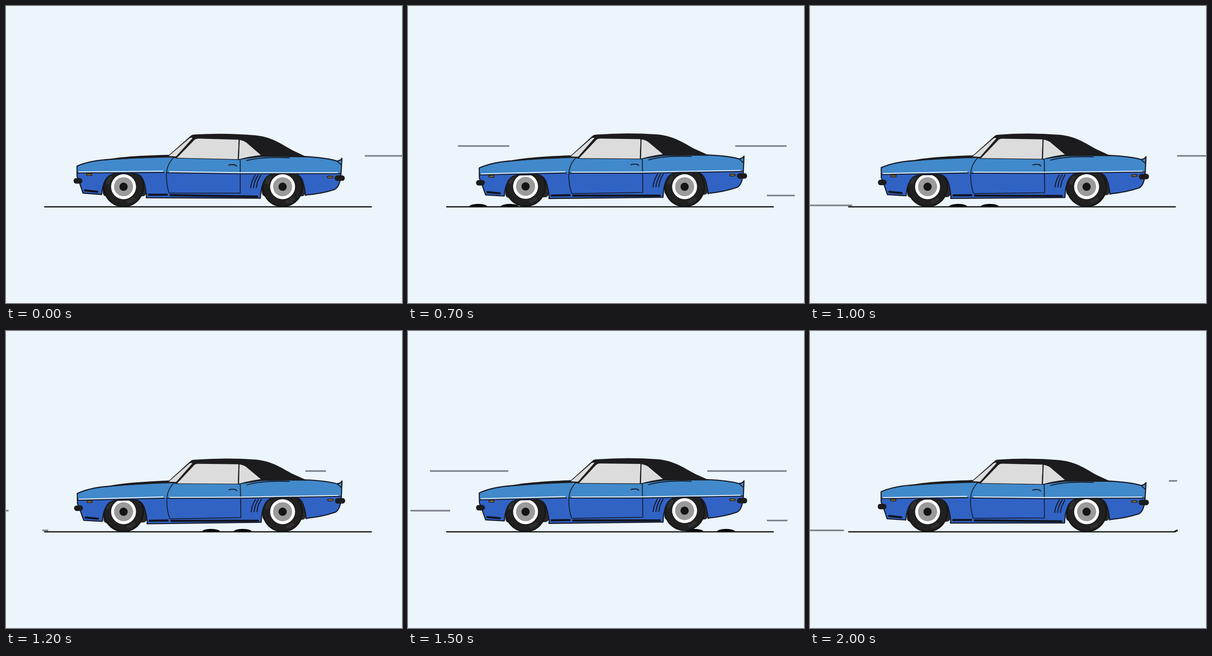
An HTML page with a canvas that plays this animation: 864 px wide and 648 px high, repeating every 2100 ms.

```html
<!DOCTYPE html>
<html lang="en">
<head>
<meta charset="utf-8">
<title>Blue coupe</title>
<style>
html, body { margin: 0; width: 100%; height: 100%; overflow: hidden; background: #ecf4fc; }
canvas { display: block; }
</style>
</head>
<body>
<canvas id="stage" width="864" height="648"></canvas>
<script>
const ctx = document.getElementById('stage').getContext('2d');
const LOOP = 2100, STEP = 100;
const INK = '#1c1c1e', EDGE = '#171a26';
const FRONT = 256.5, REAR = 603.5, AXLE = 394.3, GAP = 69;
const WIPE = 300, REACH = 173;

// x, y, then [start, hold] for each pass
const STREAKS = [
  [48, 305.5, [400, 180], [1220, 480]],
  [653, 305.5, [220, 360], [1100, 600]],
  [783, 327, [-160, 200], [700, 240], [1940, 200]],
  [-81, 392, [-20, 240], [1050, 300]],
  [-81, 435, [650, 300], [1760, 200]],
  [783, 413.5, [580, 240], [1400, 180]]
];

const P = d => new Path2D(d);
const arch = x => `L${x + 50} 413 C${x + 46} 375 ${x + 38} 365.5 ${x + 22} 365.5 h-36
  C${x - 32} 365.5 ${x - 44} 375 ${x - 48} 411 `;

const BODY = P(`M155 349 Q180 338 218 335 T354 326 L372 331 L507 334 L556 327 L650 328
  Q700 331 722 338 Q730 337 733 332 L731 365 Q729 394 717 400 Q690 409 655 412 ${arch(REAR)}
  L555 419 L306 418 ${arch(FRONT)} L168 408 L159 381 L155 371 Z`);
const LOWER = P('M140 364 L345 363.5 L511 365.5 H745 V430 H140 Z');
const CABIN = P(`M353 327 L403 283 Q406 280 413 280 Q480 276 545 282 C583 286 605 304 626 315
  L658 330 Q580 328 556 329 L508 335 L371 332 Z`);
const HOOD = P('M214 337 Q240 327 355 324.5 L369 330 Q260 332 214 337 Z');
const GLASS = [
  P('M355 327 L401 288 Q405 286 407 288 L371 328 Z'),
  P('M373 331 L411 292 Q414 289 420 289 L508 291.5 L505.5 334 Z'),
  P('M510 292 Q521 294 527 300 L556 325 Q530 328 508 334 Z')
];
const DOOR = P('M366 330 Q350 346 350 369 T356 408 H511 V336 L507 334 L508.5 291');
const SEAMS = P('M156 364 L345 363 M352 363.5 L511 366 L729 365.5 M525 337 Q560 328 618 331 M722 338 L731 346');
const HANDLE = P('M486 347 Q492 345 500 346.5 L503 349');
const BARS = P('M172 402 L199 405 M312 411.5 H351 M359 412.5 L548 415.5');
const TRIM = P('M159 361.8 L342 360 M357 361.2 L510 363.3 H724');
const ROAD = P('M84.5 438.2 H797');

const ease = u => { u = Math.min(1, Math.max(0, u)); return u * u * (3 - 2 * u); };
const bell = (d, width) => Math.exp(-((d / width) ** 2));

function fill(path, color) { ctx.fillStyle = color; ctx.fill(path); }
function line(path, color, width) {
  ctx.strokeStyle = color;
  ctx.lineWidth = width;
  ctx.stroke(path);
}
function disc(x, y, r, color) {
  ctx.fillStyle = color;
  ctx.beginPath();
  ctx.arc(x, y, r, 0, Math.PI * 2);
  ctx.fill();
}
function pill(x, y, w, h, r, color) {
  ctx.fillStyle = color;
  ctx.beginPath();
  ctx.roundRect(x - w / 2, y - h / 2, w, h, r);
  ctx.fill();
}

function streaks(t) {
  ctx.fillStyle = '#7b8089';
  for (const [x, y, ...passes] of STREAKS)
    for (const [start, hold] of passes) {
      const head = REACH * ease((t - start) / WIPE);
      const tail = REACH * ease((t - start - hold) / WIPE);
      if (head > tail) ctx.fillRect(x + tail, y - 1.7, head - tail, 3.4);
    }
}

function road(bumps) {
  ctx.save();
  ctx.beginPath();
  ctx.rect(83, 425, 719, 15);
  ctx.clip();
  ctx.fillStyle = '#050505';
  for (const x of bumps) {
    ctx.beginPath();
    ctx.ellipse(x, 437.5, 19.5, 5.8, 0, Math.PI, 0);
    ctx.fill();
  }
  ctx.restore();
  line(ROAD, '#171917', 2.8);
}

function wheel(x, bumps) {
  const y = AXLE - bumps.reduce((lift, b) => lift + 5 * bell(b - x, 25), 0);
  disc(x, y, 44.5, '#131313');
  disc(x, y, 42, '#202020');
  ctx.strokeStyle = '#2e2e2e';
  ctx.lineWidth = 8;
  for (const a of [.9, 3.4]) {
    ctx.beginPath();
    ctx.arc(x, y, 35, a, a + .35);
    ctx.stroke();
  }
  disc(x, y, 27.2, '#ffffff');
  disc(x, y, 20.8, '#9a9a9a');
  disc(x, y, 9, '#151515');
}

function shell() {
  fill(BODY, '#4189cb');
  ctx.save();
  ctx.clip(BODY);
  fill(LOWER, '#3163c5');
  ctx.restore();
  line(BODY, EDGE, 2.4);
  fill(HOOD, INK);
  fill(CABIN, INK);
  GLASS.forEach(g => fill(g, '#dcdcdc'));
  line(SEAMS, EDGE, 2);
  line(DOOR, EDGE, 1.8);
  line(HANDLE, EDGE, 2.2);
  for (let x = 543.5; x < 557; x += 6.3) line(P(`M${x} 369 q-8 12 -10 27`), EDGE, 2.2);
  line(TRIM, '#edf3fa', 2);
  line(BARS, '#11141f', 4.6);
  for (const [x, y] of [[181.5, 367.5], [707, 373]]) {
    pill(x, y, 13, 5.5, 1.5, INK);
    pill(x, y, 10, 2.8, 1, '#8c6a2b');
  }
  pill(157, 381.3, 19, 12, 5.5, INK);
  pill(728, 375.3, 22, 12, 5.5, INK);
}

// The body noses down, rocks, and rises over whichever axle crosses the bumps.
function pose(t, mid) {
  const front = 7 * bell(mid - FRONT, 45), rear = 7 * bell(mid - REAR, 45);
  const ramp = Math.min(1, t / 600, (LOOP - t) / 250);
  const dive = ramp * (.0145 + .003 * Math.cos((t - 700) / 500 * Math.PI * 2));
  return { pitch: (front - rear) / (REAR - FRONT) - dive, rise: (front + rear) / 2 };
}

function draw(t) {
  const x = -6 + 832 * ease((t - 140) / 2000), bumps = [x, x + GAP];
  const { pitch, rise } = pose(t, x + GAP / 2);
  ctx.fillStyle = '#ecf4fc';
  ctx.fillRect(0, 0, 864, 648);
  ctx.lineJoin = ctx.lineCap = 'round';
  streaks(t);
  road(bumps);

  const tilt = paint => {
    ctx.save();
    ctx.translate(442, 320.3 - rise);
    ctx.rotate(pitch);
    ctx.translate(-442, -320);
    paint();
    ctx.restore();
  };
  const axles = [FRONT, REAR];
  tilt(() => axles.forEach(a => pill(a + 2, 391, 95, 48, 8, '#292929')));
  axles.forEach(a => wheel(a, bumps));
  tilt(shell);
}

const start = performance.now();
function tick() {
  const t = (performance.now() - start) % LOOP;
  draw(Math.floor(t / STEP) * STEP);
  requestAnimationFrame(tick);
}
tick();
</script>
</body>
</html>
```
